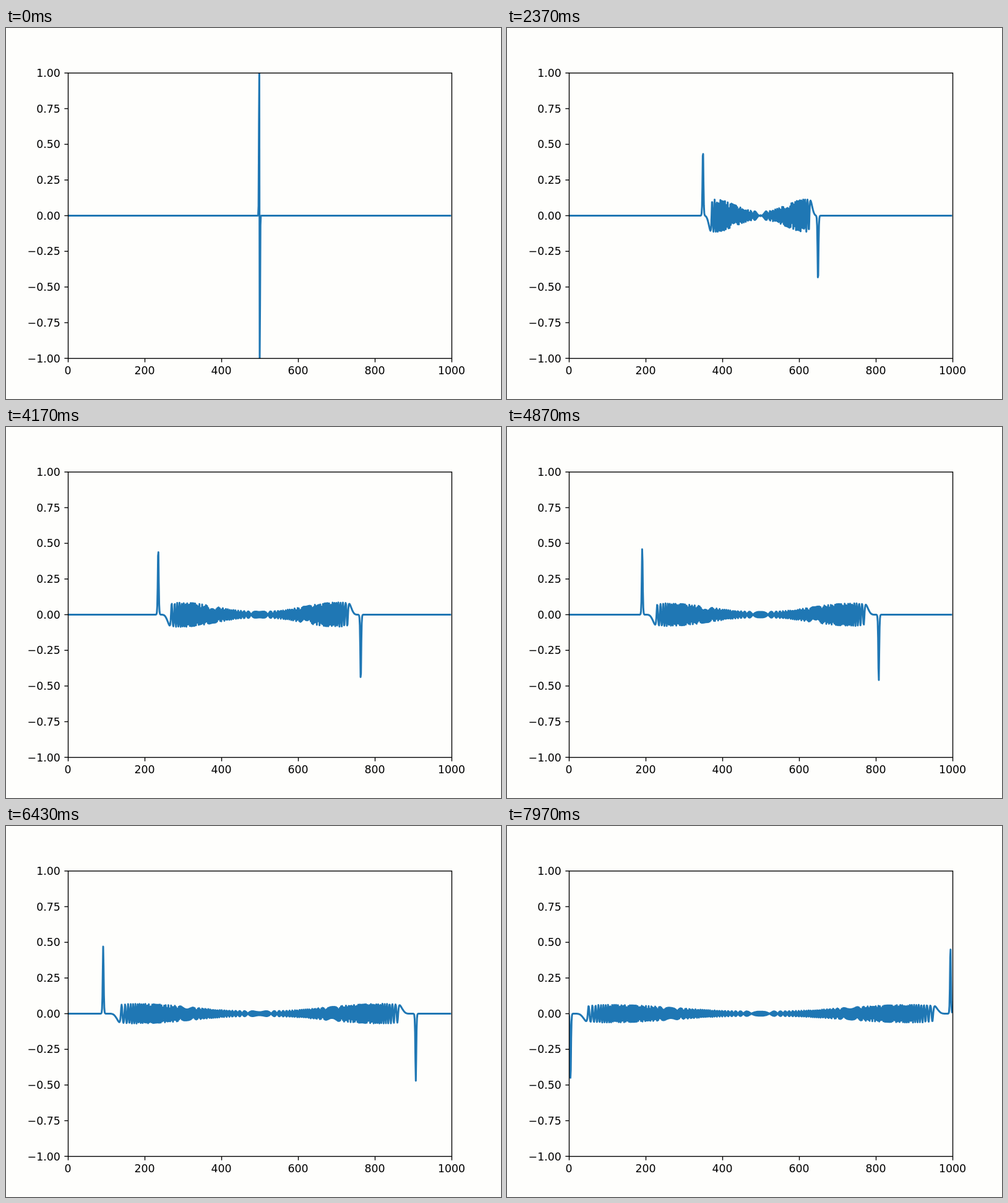
These frames come from a looping animation (800 by 600 pixels, 8000 ms). An HTML page:

```html
<!DOCTYPE html>
<html lang="en">
<head>
<meta charset="utf-8">
<title>Lattice waves</title>
<style>
  html, body { margin: 0; width: 100%; height: 100%; overflow: hidden; background: #fefefc; }
  svg { display: block; width: 800px; height: 600px; }
  text { font: 17.36px "DejaVu Sans", sans-serif; fill: #000; }
  .axis { fill: none; stroke: #000; stroke-width: 1.39; }
  #wave { fill: none; stroke: #1f77b4; stroke-width: 3; stroke-linejoin: round; }
</style>
</head>
<body>
<svg viewBox="0 0 800 600">
  <clipPath id="plot"><rect x="100" y="72.5" width="620" height="462"/></clipPath>
  <g id="ticks"></g>
  <path id="wave" clip-path="url(#plot)"/>
  <rect class="axis" x="100.5" y="72.8" width="620" height="461.6"/>
</svg>
<script>
const start = performance.now();
const LOOP = 8000, FRAMES = 240, SITES = 1000;
const FRAME_TIME = 1.959, SUBSTEPS = 32;

const px = n => 100 + 0.62 * n;
const py = v => 303.5 - 230.75 * v;

function add(name, attrs, text = "") {
  const el = document.createElementNS("http://www.w3.org/2000/svg", name);
  for (const key in attrs) el.setAttribute(key, attrs[key]);
  el.textContent = text;
  document.getElementById("ticks").append(el);
}

for (let n = 0; n <= 1000; n += 200) {
  const x = px(n) + 0.5;
  add("path", { class: "axis", d: `M${x} 534.5v6.1` });
  add("text", { x: px(n), y: 559.5, "text-anchor": "middle" }, n);
}
for (let i = -4; i <= 4; i++) {
  const v = i / 4, y = py(v);
  add("path", { class: "axis", d: `M100.5 ${y}h-6.1` });
  add("text", { x: 87.8, y: y + 6.3, "text-anchor": "end" },
    (v < 0 ? "\u2212" : "") + Math.abs(v).toFixed(2));
}

// Periodic Toda lattice: four sites around the middle fly apart.
function simulate() {
  const speed = new Float64Array(SITES);
  const spring = new Float64Array(SITES).fill(1);
  const mid = SITES / 2;
  speed.set([0.85, 0.943, -0.943, -0.85], mid - 2);
  spring.set([1.4125, 0.733, 1.4125], mid - 2);

  const kick = dt => {
    let previous = spring[SITES - 1];
    for (let n = 0; n < SITES; n++) {
      speed[n] += dt * (spring[n] - previous);
      previous = spring[n];
    }
  };
  const drift = dt => {
    for (let n = 0; n < SITES; n++) {
      spring[n] *= Math.exp(dt * (speed[(n + 1) % SITES] - speed[n]));
    }
  };
  const advance = time => {
    const h = time / SUBSTEPS;
    kick(h / 2);
    for (let i = 0; i < SUBSTEPS; i++) {
      drift(h);
      kick(i < SUBSTEPS - 1 ? h : h / 2);
    }
  };

  advance(-0.45);
  return Array.from({ length: FRAMES }, () => {
    const state = Float32Array.from(speed);
    advance(FRAME_TIME);
    return state;
  });
}

const states = simulate();
const wave = document.getElementById("wave");
let shown = -1;

function draw() {
  const t = (performance.now() - start) % LOOP;
  const frame = Math.min(FRAMES - 1, Math.floor((t + 3.4) * FRAMES / LOOP));
  if (frame !== shown) {
    shown = frame;
    wave.setAttribute("d", "M" + Array.from(states[frame],
      (v, n) => px(n).toFixed(2) + " " + py(v).toFixed(2)).join("L"));
  }
  requestAnimationFrame(draw);
}
draw();
</script>
</body>
</html>
```
